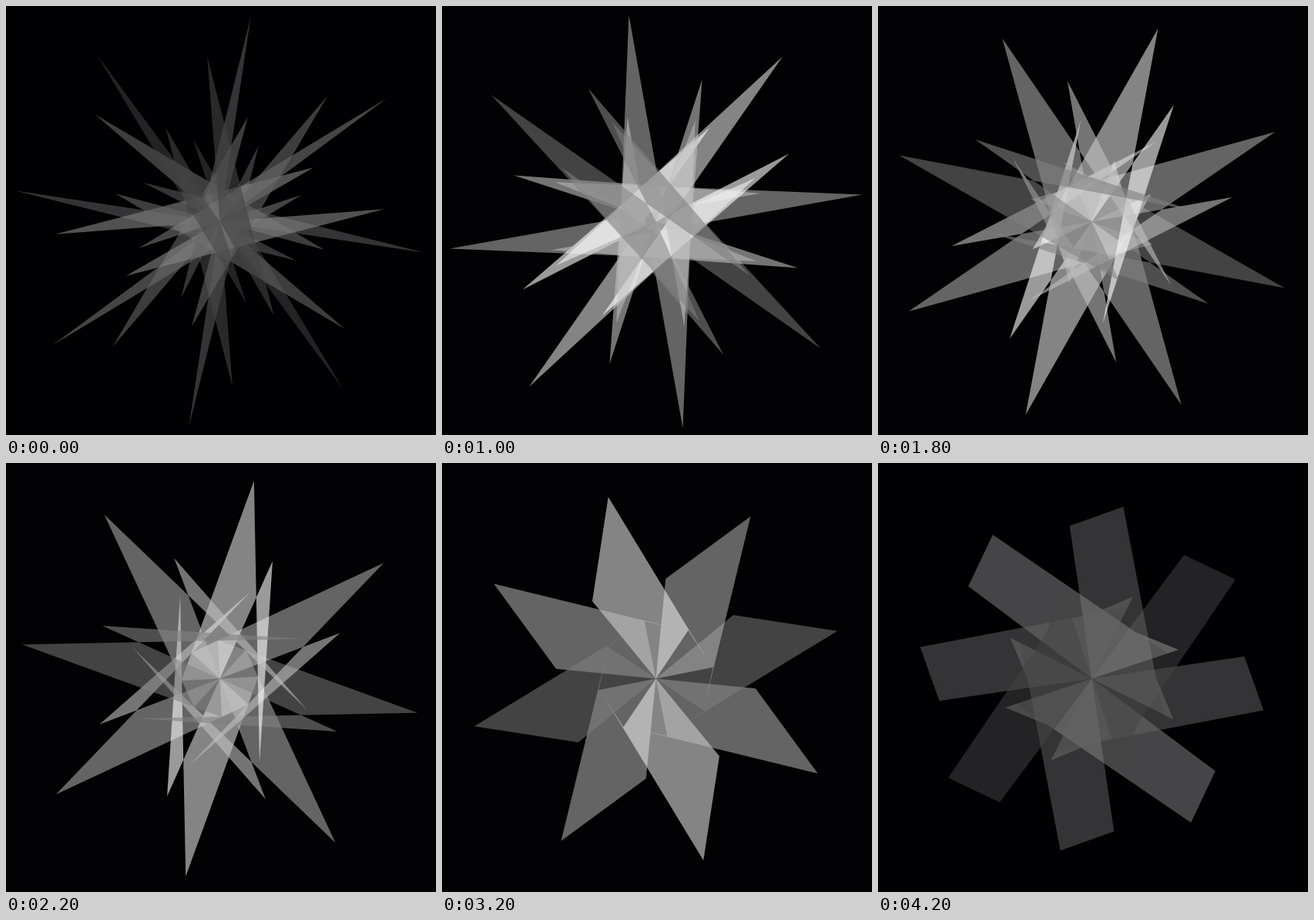
Write an HTML page with a canvas that moves like this. It is 558x556 px and loops after 4.4 s.

```html
<!DOCTYPE html>
<html lang="en">
<head>
<meta charset="utf-8">
<title>Turning star</title>
<style>
  html, body { margin: 0; width: 100%; height: 100%; overflow: hidden; background: #020204; }
  canvas { display: block; }
</style>
</head>
<body>
<canvas id="stage" width="558" height="556"></canvas>
<script>
const ctx = document.getElementById('stage').getContext('2d');
const LOOP = 4400, STEP = 200;
const CENTER = [277.5, 279.5];
const BACKGROUND = '#020204';
const TONES = [255, 192, 128, 192];
const BODY_ALPHA = 0.512, FLAP_ALPHA = 0.6;

// time, turn in degrees, tip radius, then left, low and side corners (x right, y towards the tip)
const POSES = [
  [0,    53.6,  269,   -35, -105.5,   -15.7, -139.7,  113.5, 181.5],
  [600,  46.2,  271,   -57.8, -135,   0, -143,        101, 166.8],
  [1400, 28,    267.7, -71.4, -97.6,  38.7, -131.4,   65.3, 182.4],
  [2200, 9.8,   260.3, -48.7, -11,    69.2, -98,      41.5, 161.8],
  [2800, -4.5,  251.3, -49.5, 71.5,   66.8, -12.3,    38.3, 98.3],
  [3600, -24.3, 235.8, -59.6, 157.6,  78, 5.8,        80.3, 5.5],
  [4200, -34.6, 226.5, -64, 189.5,    81.4, 16.4,     113.9, -33.1]
];

function slope(i, k) {
  const before = POSES[i - 1], after = POSES[i + 1];
  return before && after ? (after[k] - before[k]) / (after[0] - before[0]) : 0;
}

function poseAt(time) {
  let i = 0;
  while (i < POSES.length - 2 && time >= POSES[i + 1][0]) i++;
  const from = POSES[i], to = POSES[i + 1], span = to[0] - from[0];
  const u = Math.min(1, (time - from[0]) / span), u2 = u * u, u3 = u2 * u;
  return from.map((v, k) =>
    v * (2 * u3 - 3 * u2 + 1) + to[k] * (3 * u2 - 2 * u3) +
    span * (slope(i, k) * (u3 - 2 * u2 + u) + slope(i + 1, k) * (u3 - u2)));
}

const cross = (a, b) => a[0] * b[1] - a[1] * b[0];

function fillPolygon(points, alpha) {
  ctx.globalAlpha = alpha;
  ctx.beginPath();
  for (const [x, y] of points) ctx.lineTo(x, -y);
  ctx.fill();
}

// The edge from tip to low corner may cross the side edge, which leaves a flap outside the body.
function petalParts([, , radius, leftX, leftY, lowX, lowY, sideX, sideY]) {
  const hub = [0, 0], tip = [0, radius];
  const left = [leftX, leftY], low = [lowX, lowY], side = [sideX, sideY];
  const edge = [lowX, lowY - radius];
  const u = cross(tip, edge) / cross(side, edge);
  if (u >= 1) return { body: [hub, left, tip, low, side] };
  const fold = side.map(v => v * Math.max(0, u));
  return { body: [hub, left, tip, fold], flap: [fold, low, side] };
}

function draw(time) {
  const pose = poseAt(time);
  const { body, flap } = petalParts(pose);
  ctx.globalAlpha = 1;
  ctx.fillStyle = BACKGROUND;
  ctx.fillRect(0, 0, 558, 556);
  for (let i = 5; i >= -2; i--) {
    const tone = TONES[(i + 4) % 4];
    ctx.save();
    ctx.translate(...CENTER);
    ctx.rotate((pose[1] + 45 * i) * Math.PI / 180);
    ctx.fillStyle = `rgb(${tone}, ${tone}, ${tone})`;
    fillPolygon(body, BODY_ALPHA);
    if (flap) fillPolygon(flap, FLAP_ALPHA);
    ctx.restore();
  }
  if (time < STEP || time >= LOOP - STEP) {
    ctx.globalAlpha = 0.48;
    ctx.fillStyle = BACKGROUND;
    ctx.fillRect(0, 0, 558, 556);
  }
}

const start = performance.now();
function tick() {
  const elapsed = (performance.now() - start) % LOOP;
  draw(Math.floor(elapsed / STEP) * STEP);
  requestAnimationFrame(tick);
}
tick();
</script>
</body>
</html>
```
